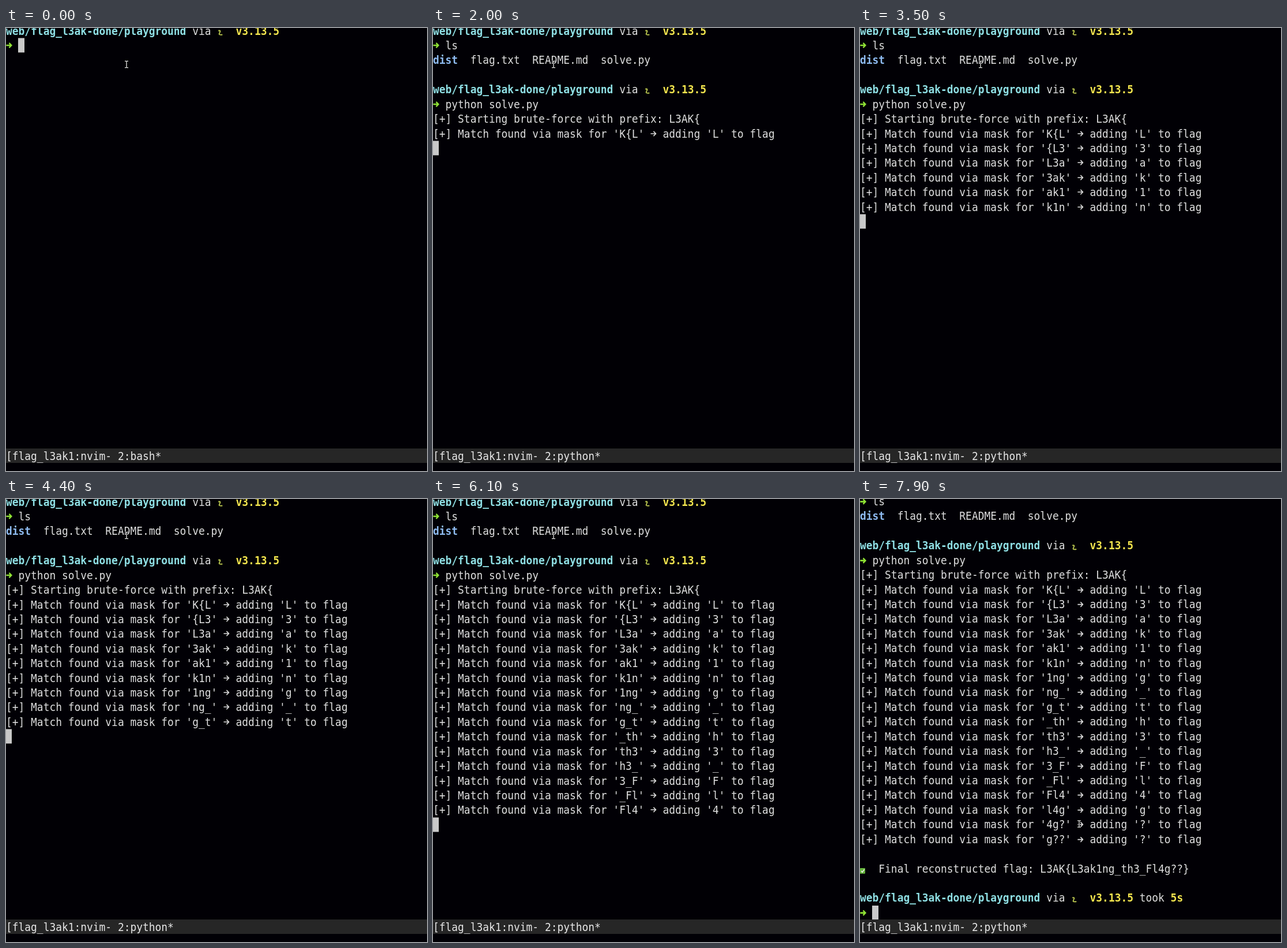
An HTML page that plays this animation: 730x767 px, repeating every 8 s.

```html
<!DOCTYPE html>
<html lang="en">
<head>
<meta charset="utf-8">
<title>Terminal session</title>
<style>
  :root { --cell: 10.78px; --row: 25.42px; }
  html, body { margin: 0; width: 100%; height: 100%; overflow: hidden; background: #010005; }
  #stage {
    position: relative; width: 730px; height: 767px; overflow: hidden;
    font: 17.905px "DejaVu Sans Mono", monospace; font-variant-ligatures: none;
    color: #dedede;
  }
  #screen { position: absolute; left: 0; top: -8.4px; }
  .row {
    position: absolute; left: 0; height: var(--row); line-height: var(--row);
    white-space: pre; transform: scaleY(1.1);
  }
  .path { color: #8fdfe4; }
  .ver { color: #f3e54e; }
  .dir { color: #8fbcf2; }
  .icon { display: inline-block; height: 14px; vertical-align: -3px; fill: none; }
  #cursor { position: absolute; width: 11px; height: 25px; background: #c9c9c9; }
  #status { position: absolute; left: 0; top: 728.4px; width: 730px; height: 25px; background: #262626; color: #e6e6e6; }
  #pointer { position: absolute; left: -5px; top: -8px; fill: none; }
</style>
</head>
<body>
<div id="stage">
  <div id="screen"><div id="cursor"></div></div>
  <div id="status"><div class="row" id="tabs"></div></div>
  <svg id="pointer" width="10" height="16">
    <defs><path id="beam" d="M2 2.3H4.2L5 3L5.8 2.3H8M5 3V13M2 13.7H4.2L5 13L5.8 13.7H8"/></defs>
    <use href="#beam" stroke="#000" stroke-width="2.8"/>
    <use href="#beam" stroke="#e4e4e4" stroke-width="1.3"/>
  </svg>
</div>
<script>
const LOOP = 8000, CELL = 10.78, ROW = 25.42, TOP = 8.4, DONE = 7100;
const $ = id => document.getElementById(id);
const screen = $("screen"), cursor = $("cursor"), tabs = $("tabs"), pointer = $("pointer");

const icon = (cells, body) =>
  `<svg class="icon" style="width:${cells * CELL}px" viewBox="0 0 ${cells * CELL} 14">${body}</svg>`;
const arrowIcon = (color, weight) => icon(1,
  `<path d="M.4 5H9.4M5.4 1.2L9.4 5L5.4 8.8" stroke="${color}" stroke-width="${weight}"/>`);
const snake = icon(2, '<path d="M2.2 4.6H4.6Q6 5 5 6.8T3.6 10.2Q4.5 11.6 9.3 10.8" stroke="#b5c14d" stroke-width="1.9"/>');
const check = icon(2, '<rect y="3.5" width="9" height="9" rx="1" fill="#64b33b"/><path d="M2 8L4 10.2L7.5 5.5" stroke="#eee" stroke-width="1.5"/>');
const prompt = `<b class="path">web/flag_l3ak-done/playground</b> via ${snake} <b class="ver">v3.13.5</b>`;
const arrow = arrowIcon("#8fe234", 2.3) + " ";
const to = arrowIcon("#dedede", 1.5);

const rows = [];
function addRow(line, time, html) {
  const el = document.createElement("div");
  el.className = "row";
  el.style.top = line * ROW + "px";
  el.innerHTML = html;
  screen.append(el);
  rows.push({ el, time });
  return el;
}

function addInput(line, time) {
  const text = document.createElement("span");
  addRow(line, time, arrow).append(text);
  return text;
}

addRow(0, 0, prompt);
const first = addInput(1, 0);
addRow(2, 500, '<b class="dir">dist</b>  flag.txt  README.md  solve.py');
addRow(4, 600, prompt);
const second = addInput(5, 600);
addRow(6, 1600, "[+] Starting brute-force with prefix: L3AK{");

const known = "K{L3ak1ng_th3_Fl4g??";
const hits = [2000, 2200, 2500, 2900, 3200, 3500, 3800, 4100, 4400, 4700,
  5000, 5300, 5600, 5900, 6100, 6500, 6800, DONE];
hits.forEach((time, i) => addRow(7 + i, time,
  `[+] Match found via mask for '${known.slice(i, i + 3)}' ${to} adding '${known[i + 2]}' to flag`));

addRow(26, DONE, `${check} Final reconstructed flag: L3AK{L3ak1ng_th3_Fl4g??}`);
addRow(28, DONE, prompt + ' took <b class="ver">5s</b>');
addRow(29, DONE, arrow);

const typedLs = [[0, ""], [300, "l"], [400, "ls"]];
const typedRun = [[0, ""], [800, "p"], [900, "pyt"], [1000, "pytho"], [1100, "python "],
  [1200, "python s"], [1300, "python solve.py "]];
const path = [[0, [209, 63]], [7600, [236, 141]], [7700, [296, 315]], [7800, [357, 493]], [7900, [380, 562.5]]];

// Value of the last step already reached
const at = (steps, t) => steps.filter(s => s[0] <= t).pop()[1];

function cursorCell(t, ls, run) {
  if (t < 500) return [2 + ls.length, 1];
  if (t < 600) return [0, 3];
  if (t < 1400) return [2 + run.length, 5];
  if (t < 1600) return [0, 6];
  if (t < DONE) return [0, 7 + hits.filter(h => h <= t).length];
  return [2, 29];
}

function draw(t) {
  const ls = at(typedLs, t), run = at(typedRun, t);
  first.textContent = ls;
  second.textContent = run;
  for (const r of rows) r.el.style.visibility = t >= r.time ? "visible" : "hidden";

  // The cursor block sits on whole pixels
  const [col, line] = cursorCell(t, ls, run);
  const left = Math.floor(col * CELL - 0.5);
  cursor.style.transform = `translate(${left}px, ${Math.round(line * ROW - TOP) + TOP}px)`;
  screen.style.transform = t >= DONE ? `translateY(${-ROW}px)` : "none";
  tabs.textContent = `[flag_l3ak1:nvim- 2:${t < 2000 ? "bash" : "python"}*`;

  const [x, y] = at(path, t);
  pointer.style.transform = `translate(${x}px, ${y}px)`;
}

const start = performance.now();
function frame() {
  draw((performance.now() - start) % LOOP);
  requestAnimationFrame(frame);
}
draw(0);
requestAnimationFrame(frame);
</script>
</body>
</html>
```
